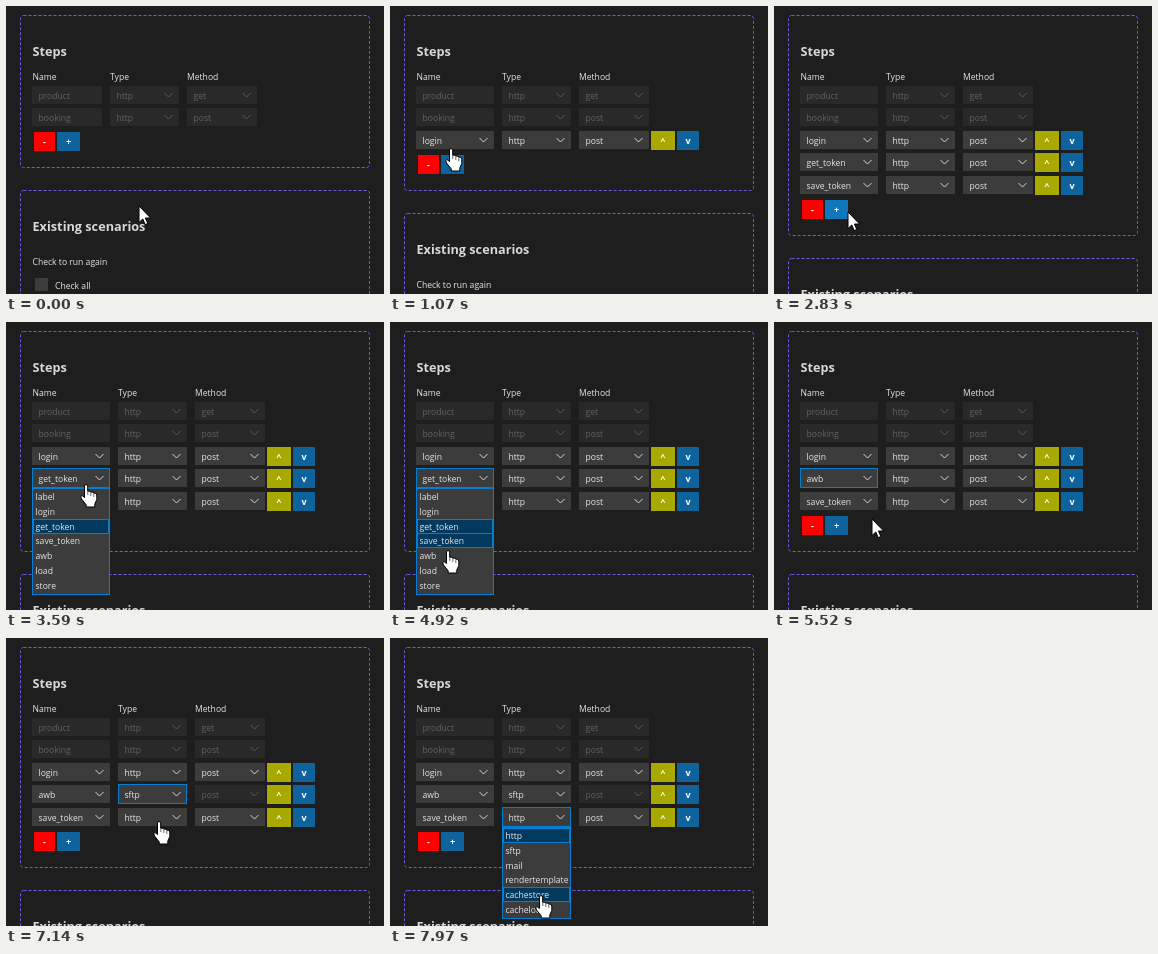
An HTML page with a canvas for the animation above (8 s loop, 378 px wide and 288 px high).

```html
<!DOCTYPE html>
<html lang="en">
<head>
<meta charset="utf-8">
<title>Scenario steps</title>
<style>
  html, body { margin: 0; width: 100%; height: 100%; overflow: hidden; background: #1e1e1e; }
  canvas { display: block; }
</style>
</head>
<body>
<canvas id="stage" width="378" height="288"></canvas>
<script>
const ctx = document.getElementById('stage').getContext('2d');
const LOOP = 8000;
const FONT = '"Open Sans", "Noto Sans", sans-serif';
const COLOR = {
  page: '#1e1e1e', dash: '#6f5be8', heading: '#d8d8d8', text: '#e6e6e6',
  field: '#3c3c3c', dimField: '#292929', dimText: '#626262', focus: '#007fd4',
  active: '#04395e', blue: '#0e639c', blueHover: '#1177bb', red: '#ff0000', olive: '#a8a800'
};
const NAMES = ['label', 'login', 'get_token', 'save_token', 'awb', 'load', 'store'];
const TYPES = ['http', 'sftp', 'mail', 'rendertemplate', 'cachestore', 'cacheload'];
const ITEM = 14.8;

// Pointer hotspot: time, x, y
const PATH = [
  [0, 133, 200], [30, 133, 200], [330, 58, 143], [470, 58, 143], [600, 60, 143],
  [740, 60, 143], [800, 61, 142], [1070, 61, 142], [1410, 61, 155], [1640, 61, 155],
  [1680, 62, 156], [1790, 62, 156], [2220, 66, 181], [2490, 66, 181], [2830, 74, 206],
  [2870, 74, 206], [3250, 79, 145], [3320, 79, 145], [3520, 80, 162], [3620, 80, 162],
  [4110, 55, 215], [4310, 55, 219], [4400, 55, 219], [4530, 55, 221], [4860, 55, 221],
  [4920, 58, 228], [4990, 58, 230], [5190, 58, 230], [5930, 153, 151], [6000, 153, 152],
  [6130, 153, 168], [6410, 152, 186], [6740, 152, 188], [6940, 152, 188], [7300, 153, 180],
  [7450, 153, 181], [7700, 153, 228], [7880, 153, 261], [7970, 151, 257], [8000, 151, 257]
];

function pointerAt(t) {
  const i = Math.max(1, PATH.findIndex(k => k[0] > t));
  const [t0, x0, y0] = PATH[i - 1], [t1, x1, y1] = PATH[i];
  const p = Math.min(1, Math.max(0, (t - t0) / (t1 - t0)));
  const e = p * p * (3 - 2 * p);
  return { x: x0 + (x1 - x0) * e, y: y0 + (y1 - y0) * e };
}

function stateAt(t) {
  return {
    added: [1070, 1750, 2490].filter(at => t >= at).length,
    names: ['login', t < 5190 ? 'get_token' : 'awb', 'save_token'],
    types: ['http', t < 6550 ? 'http' : 'sftp', 'http'],
    methodOff: t >= 6940,
    focus: t < 3460 ? '' : t < 5930 ? 'name1' : t < 7400 ? 'type1' : 'type2',
    open: (t >= 3520 && t < 5190) || (t >= 6000 && t < 6550) || t >= 7450
  };
}

let targets, pointer, trail;
const inside = (p, r) => p.x >= r[0] && p.x < r[0] + r[2] && p.y >= r[1] && p.y < r[1] + r[3];

function box(x, y, w, h, color) {
  ctx.fillStyle = color;
  ctx.fillRect(x, y, w, h);
}

function outline(x, y, w, h, color) {
  ctx.strokeStyle = color;
  ctx.lineWidth = 1;
  ctx.strokeRect(x + .5, y + .5, w - 1, h - 1);
}

function label(str, x, y, color = COLOR.text, size = 8.6, weight = 400, align = 'left') {
  ctx.font = `${weight} ${size}px ${FONT}`;
  ctx.textAlign = align;
  ctx.fillStyle = color;
  ctx.fillText(str, x, y);
}

function dashedPanel(y, h) {
  ctx.strokeStyle = COLOR.dash;
  ctx.lineWidth = 1;
  ctx.setLineDash([3, 2]);
  ctx.beginPath();
  ctx.roundRect(14.5, y + .5, 349, h, 3);
  ctx.stroke();
  ctx.setLineDash([]);
}

function field(str, x, y, w, { dim = false, arrow = true, focused = false } = {}) {
  const color = dim ? COLOR.dimText : COLOR.text;
  box(x, y, w, 18, dim ? COLOR.dimField : COLOR.field);
  label(str, x + 6.5, y + 12.6, color);
  if (arrow) {
    const cx = x + w - 10.5, cy = y + 9;
    ctx.strokeStyle = color;
    ctx.lineWidth = .9;
    ctx.beginPath();
    ctx.moveTo(cx - 4, cy - 2);
    ctx.lineTo(cx, cy + 2);
    ctx.lineTo(cx + 4, cy - 2);
    ctx.stroke();
  }
  if (focused) outline(x, y - 1, w, 20, COLOR.focus);
  if (!dim) targets.push([x, y, w, 18]);
}

function button(str, x, y, w, color, hover = color) {
  const rect = [x, y, w, 19];
  box(...rect, inside(trail, rect) ? hover : color);
  label(str, x + w / 2, y + 13, '#fff', 9, 700, 'center');
  targets.push(rect);
}

function dropdown(items, selected, x, y, w) {
  const h = Math.round(items.length * ITEM + 3);
  box(x, y, w, h, COLOR.field);
  items.forEach((item, i) => {
    const top = Math.round(y + 1 + i * ITEM);
    const rect = [x + 1, top, w - 2, 15];
    const hovered = inside(trail, [x, y + 1 + i * ITEM, w, ITEM]);
    if (item === selected || hovered) {
      box(...rect, COLOR.active);
      outline(...rect, COLOR.focus);
    }
    label(item, x + 3.5, top + 10.6);
  });
  outline(x, y, w, h, COLOR.focus);
  targets.push([x, y, w, h]);
}

function polygon(points) {
  ctx.beginPath();
  points.forEach(([x, y]) => ctx.lineTo(x, y));
  ctx.closePath();
}

function drawPointer() {
  const hand = targets.some(r => inside(pointer, r));
  ctx.save();
  ctx.translate(Math.round(pointer.x), Math.round(pointer.y));
  ctx.fillStyle = '#fff';
  ctx.strokeStyle = '#000';
  ctx.lineWidth = 1;
  ctx.lineJoin = 'round';
  if (hand) {
    polygon([[-1.5, 2], [-.8, .7], [1, .7], [1.7, 2], [1.7, 7], [4.3, 7.4], [5, 8],
      [7.2, 8.2], [8, 9], [9.8, 9.4], [10.8, 11], [10.8, 15.5], [8.8, 20], [8.8, 23],
      [.2, 23], [.2, 20.8], [-4.5, 15], [-5.3, 12.6], [-4, 11.6], [-1.5, 13.5]]);
    ctx.fill();
    ctx.stroke();
    ctx.lineWidth = .6;
    ctx.beginPath();
    for (const [x, y] of [[1.8, 7], [4.8, 8], [7.8, 9]]) {
      ctx.moveTo(x, y);
      ctx.lineTo(x, y + 4);
    }
    ctx.stroke();
  } else {
    polygon([[0, 0], [0, 16.5], [3.8, 13], [6.2, 18.6], [8.8, 17.5], [6.4, 12], [11.6, 12]]);
    ctx.fill();
    ctx.stroke();
  }
  ctx.restore();
}

function draw(t) {
  const s = stateAt(t);
  const n = s.added;
  const nameW = n ? 78 : 70;
  const typeX = 34 + nameW, methodX = typeX + 77;
  const rowY = i => Math.floor(80 + 22.5 * i);
  const shift = Math.round(22.6 * n);
  targets = [];
  pointer = pointerAt(t);
  trail = pointerAt(Math.max(0, t - 40));

  box(0, 0, 378, 288, COLOR.page);
  dashedPanel(9, 152 + shift);
  label('Steps', 26.5, 50, COLOR.heading, 12.7, 700);
  label('Name', 26.5, 73.6);
  label('Type', typeX, 73.6);
  label('Method', methodX, 73.6);

  [['product', 'get'], ['booking', 'post']].forEach(([name, method], i) => {
    field(name, 26, rowY(i), nameW, { dim: true, arrow: false });
    field('http', typeX, rowY(i), 69, { dim: true });
    field(method, methodX, rowY(i), 70, { dim: true });
  });

  for (let i = 0; i < n; i++) {
    const y = rowY(i + 2);
    field(s.names[i], 26, y, nameW, { focused: s.focus === 'name' + i });
    field(s.types[i], typeX, y, 69, { focused: s.focus === 'type' + i });
    field('post', methodX, y, 70, { dim: i === 1 && s.methodOff });
    button('^', 261, y, 24, COLOR.olive);
    button('v', 287, y, 22, COLOR.blue, COLOR.blueHover);
  }
  button('-', 28, 126 + shift, 21, COLOR.red);
  button('+', 51, 126 + shift, 23, COLOR.blue, COLOR.blueHover);

  const top = 184 + shift;
  dashedPanel(top, 200);
  label('Existing scenarios', 26.5, top + 41, COLOR.heading, 12.7, 700);
  label('Check to run again', 26.5, top + 74.6);
  box(29, top + 88, 13, 13, COLOR.field);
  label('Check all', 49, top + 98.6);

  if (s.open) {
    const row = Number(s.focus.slice(-1));
    const y = rowY(row + 2) + 18;
    if (s.focus.startsWith('name')) dropdown(NAMES, s.names[row], 26, y + 1, nameW);
    else dropdown(TYPES, s.types[row], typeX, y + 1, 69);
  }
  drawPointer();
}

const start = performance.now();
function tick() {
  draw((performance.now() - start) % LOOP);
  requestAnimationFrame(tick);
}
tick();
</script>
</body>
</html>
```
